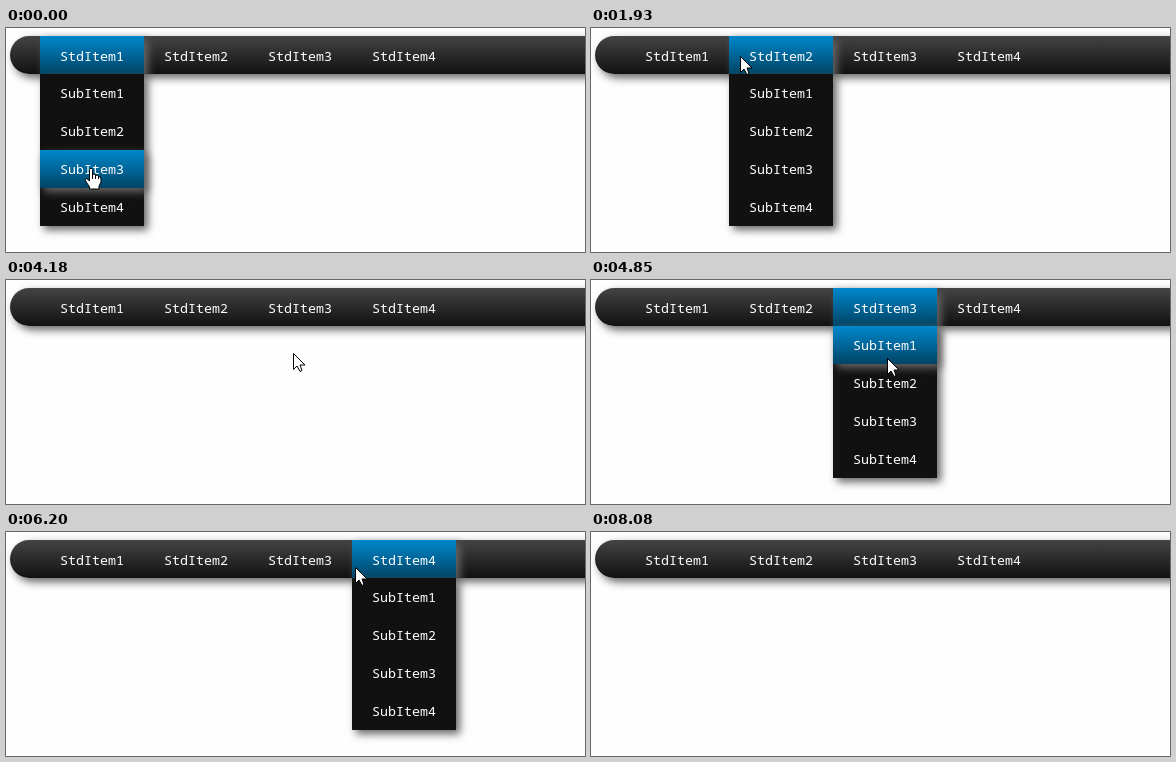
An HTML page that plays this animation: 579 px wide and 224 px high, repeating every 8770 ms.

```html
<!DOCTYPE html>
<html lang="en">
<head>
<meta charset="utf-8">
<title>Drop-down menu</title>
<style>
html, body { margin: 0; width: 100%; height: 100%; overflow: hidden; background: #fefefe; }
body { position: relative; font: 300 13.33px/38px "Noto Sans Mono", "Liberation Mono", monospace; color: #fff; }
#bar, .menu, .item, .sub, #cursor { position: absolute; }
#bar, .item.on, .sub { box-shadow: 4px 4px 8px #666; }
#bar { left: 4px; top: 8px; width: 620px; height: 38px; border-radius: 20px 0 0 20px; background: linear-gradient(#444, #111); }
.menu { top: 8px; width: 104px; }
.item { left: 0; width: 84px; height: 38px; padding-left: 20px; white-space: pre; }
.item.on { background: linear-gradient(#08c, #046); }
.head { line-height: 40px; }
.sub { top: 38px; width: 104px; height: 152px; background: #111; display: none; }
.open .sub { display: block; }
#cursor { left: 0; top: 0; z-index: 2; overflow: visible; }
#cursor path { fill: #fff; stroke: #000; stroke-linejoin: round; }
</style>
</head>
<body>
<div id="bar"></div>
<svg id="cursor" width="24" height="24">
  <path id="arrow" d="M.5 .5V16.500L4 13 7 18.500 9 17.500 7 12H12Z"/>
  <path id="hand" d="M-1.500 13V1.500Q0-1.500 1.500 1.500V11 6.500Q4 5 4.500 7.500V11 7.500Q7 6 7.500 8.500V11 8.500Q10 8 10 11V14L8 18V21H-1.500V19L-6 12Q-5 9-1.500 13Z"/>
</svg>
<script>
const LOOP = 8770, LEFT = 34, TOP = 8, W = 104, H = 38;
const $ = id => document.getElementById(id);

// Pointer runs: first time, last time, number of steps, then waypoints.
const runs = [
  [0, 0, 1, [85, 140]],
  [150, 1080, 8, [88, 150], [108, 180], [157, 96]],
  [1230, 1380, 2, [87, 44], [84, 34]],
  [1810, 2050, 3, [112, 30], [186, 25]],
  [2330, 2760, 4, [190, 32], [194, 72]],
  [3040, 4040, 8, [194, 102], [202, 172], [276, 104]],
  [4180, 5120, 8, [287, 73], [290, 30], [304, 142]],
  [5420, 6200, 7, [302, 140], [349, 35]],
  [6600, 7560, 8, [368, 48], [400, 160], [214, 128], [225, 121]],
  [7680, 7940, 3, [330, 140], [553, 197]],
  [8080, 8080, 1, [-50, -50]]
];

function along(points, p) {
  const u = p * (points.length - 1), i = Math.floor(u);
  const a = points[i], b = points[i + 1] ?? a;
  return a.map((v, k) => Math.round(v + (b[k] - v) * (u - i)));
}

const stops = runs.flatMap(([from, to, n, ...points]) =>
  Array.from({ length: n }, (_, k) => {
    const p = n > 1 ? k / (n - 1) : 0;
    return [Math.floor((from + (to - from) * p) / 10) * 10, ...along(points, p)];
  }));

const add = (parent, cls, text = "") => {
  const el = document.createElement("div");
  el.className = cls;
  el.textContent = text;
  return parent.appendChild(el);
};

const menus = [1, 2, 3, 4].map((n, i) => {
  const box = add(document.body, "menu");
  box.style.left = LEFT + i * W + "px";
  const head = add(box, "item head", "StdItem" + n);
  const sub = add(box, "sub");
  const rows = [1, 2, 3, 4].map((k, j) => {
    const row = add(sub, "item", "SubItem" + k);
    row.style.top = j * H + "px";
    return row;
  });
  return { box, head, rows };
});

// The bar opens a menu, and its rows keep it open.
function hover(x, y, open) {
  const col = Math.floor((x - LEFT) / W), row = Math.floor((y - TOP) / H);
  const inBar = y >= TOP && y < TOP + H - 3;
  const inside = col >= 0 && col < 4 && (inBar || (col === open && row >= 0 && row < 5));
  return inside ? { open: col, row } : { open: -1, row: -1 };
}

let last = { open: 0 };
const states = stops.map(([t, x, y]) => {
  last = hover(x, y, last.open);
  const dx = x - LEFT - last.open * W, dy = y - TOP - last.row * H;
  const hand = last.open >= 0 && dx >= 20 && dx <= 84 && dy >= 9 && dy <= 29;
  return { t, x, y, hand, ...last };
});

function draw(now) {
  const t = now % LOOP;
  const s = states.findLast(s => s.t <= t);
  menus.forEach(({ box, head, rows }, i) => {
    const open = i === s.open;
    box.classList.toggle("open", open);
    box.style.zIndex = open ? 1 : 0;
    head.classList.toggle("on", open);
    rows.forEach((row, j) => row.classList.toggle("on", open && j === s.row - 1));
  });
  $("cursor").style.transform = `translate(${s.x}px,${s.y}px)`;
  $("arrow").style.display = s.hand ? "none" : "";
  $("hand").style.display = s.hand ? "" : "none";
}

const start = performance.now();
function tick() {
  draw(Math.max(0, performance.now() - start));
  requestAnimationFrame(tick);
}
tick();
</script>
</body>
</html>
```
